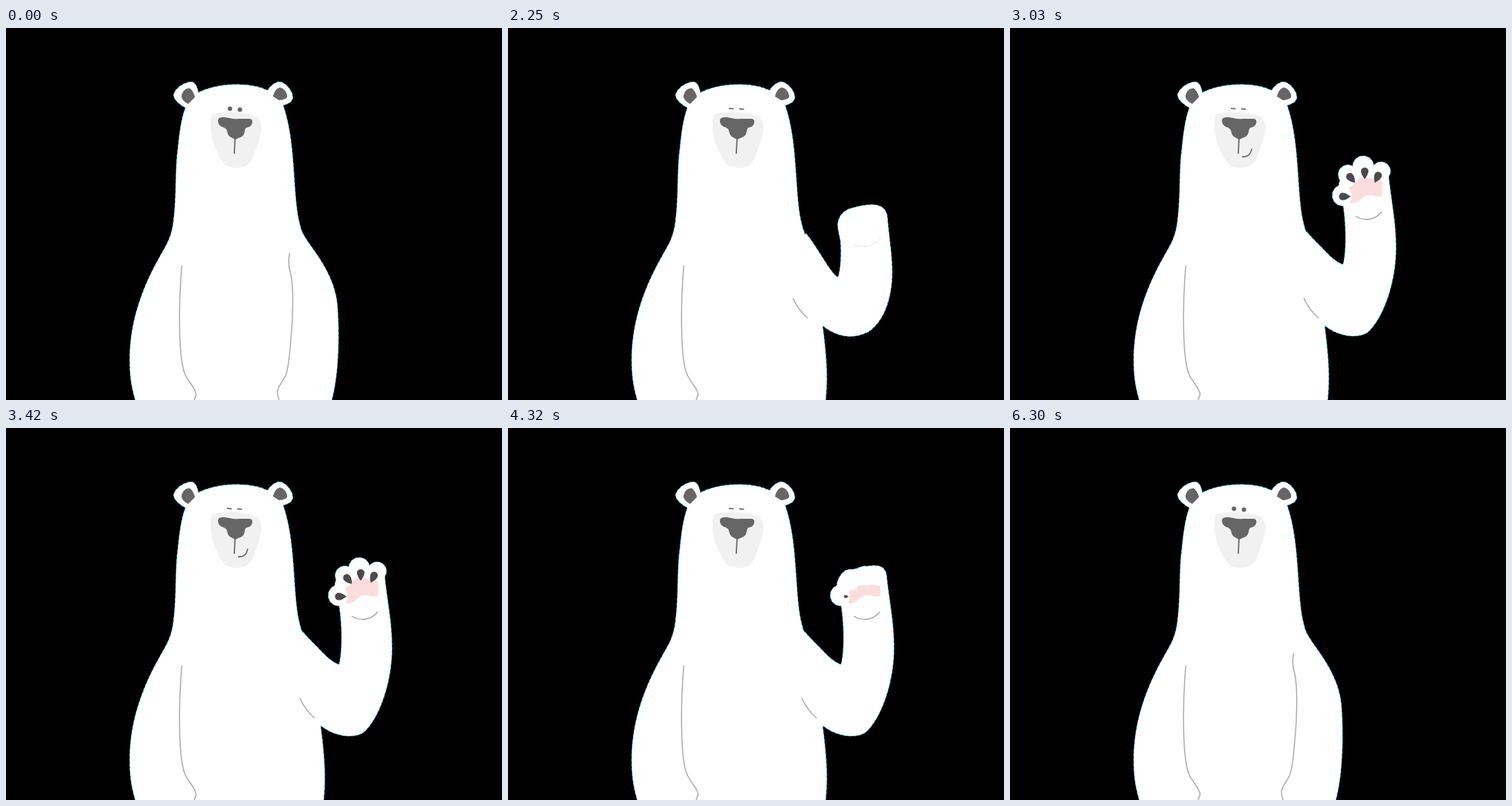
An HTML page with a canvas for the animation above (6330 ms loop, 667 by 500 pixels).

```html
<!DOCTYPE html>
<html>
<head>
<meta charset="utf-8">
<title>Waving bear</title>
<style>
html, body { margin: 0; width: 100%; height: 100%; overflow: hidden; background: #000; }
canvas { display: block; }
</style>
</head>
<body>
<canvas id="stage" width="667" height="500"></canvas>
<script>
const ctx = document.getElementById('stage').getContext('2d');
const LOOP = 6330, STEP = 30;
const GREY = '#666', LINE = '#a6a6a6';

const clamp = v => Math.max(0, Math.min(1, v));
const ramp = (t, a, b) => clamp((t - a) / (b - a));
const easeOut = u => 1 - (1 - u) ** 3;
const easeIn = u => u ** 2;

// Blend two path strings that share the same commands.
function mix(a, b, k) {
  const ends = b.match(/[\d.]+/g);
  let i = 0;
  return a.replace(/[\d.]+/g, n => (+n + (ends[i++] - n) * k).toFixed(2));
}

const head = 'M174,500C168,480 166.5,465 166.5,446C166.5,400 180,355 206,309C216,291 222,283 225,262' +
  'C230,225 227,190 231.5,160C234.5,130 237.5,118 241.5,107C234,103 226.5,97 225.5,91' +
  'C225.5,83 238,73.5 248,72.5C254,72 257,78 258.5,87C285,73 330,72.5 351.5,84' +
  'C358,75 364,72 369,72.5C377,74.5 386.5,86 385.5,94C384,100.5 378,102 372.5,104' +
  'C383.5,135 385.5,170 388.5,215C390.5,245 393.5,262 398.5,275';
const restBody = new Path2D(head +
  'C402,282 410,293 417,303C430,322 443,345 445.5,372C447.5,400 447.5,425 446,445C445,465 442,485 438,500Z');
const waveBody = new Path2D(head + 'C410,330 420,370 423,400C428,440 430.5,470 427,500Z');

const armLow = 'M400,276C405,280 412,292 420,304C430,320 438,333 444,335C449,320 448,292 447,285' +
  'C445,275 443.5,270 443.5,263C445,250 455,243.5 463,242C475,238.5 484,237.5 491,237.5' +
  'C503,238.5 508,243 510,253C512,280 516,300 516.5,325C517,358 508,392 485,408' +
  'C462,420 440,414 422,399L380,340Z';
const armHigh = 'M399,274C405,281 414,290 420,296C430,307 440,316 448,318C453,300 452,262 448,238' +
  'C446,228 442,222 442,212C444,199 452,190 460,190C470,191 474,184 483,186C499,183 507,186 509,198' +
  'C512,230 519,260 519,295C519,340 503,388 482,408C468,419 440,414 422,399L380,340Z';
const elbow = ['M383,363C388,374 395,383 403,390', 'M395,363C400,374 406,382 415,390'];
const wrist = ['M465,291C478,297 492,293 500,284', 'M465,253C478,261 492,257 500,247'];
const padShut = 'M459,218C464,219 468,217 471,212C475,210 481,214 487,210C493,212 498,212 500,212' +
  'C501,216 501,222 500,226C494,229 484,222 477,226C470,232 464,237 457,235C462,228 458,222 459,218Z';
const padOpen = 'M456,214C461,213 464,209 467,205C472,199 480,200 487,203C493,201 498,202 500,207' +
  'C501,213 501,219 500,226C494,229 484,222 477,226C470,232 464,237 457,235C462,228 458,220 456,214Z';
const claw = new Path2D('M0,0C-4,-5 -6,-10 -4.5,-13C-2.5,-16.5 2.5,-16.5 4.5,-13C6,-10 4,-5 0,0Z');

const leftArm = 'M236.4,319C233.4,355 232.4,385 234,420C235,445 238,462 243,470' +
  'C249,480 256,486 255.5,493L253,500';
const rightArm = 'M381.4,303C379.4,312 380,322 383,331C387,350 386,390 383,420C381,445 379,460 376,467' +
  'C371,477 365,483 365,489C365,493 366,496 367,500';
const muzzle = 'M275,126C275,116 280,113 290,114C300,112 315,113 325,115C340,117 344,124 343.5,138' +
  'C341,152 335,165 331,177C325,186 318,188 310,188C298,188 291,183 285,168C278,155 275,145 275,126Z';
const nose = 'M285,125C285,120 289,120 294,120C302,121 306,123 313,122L327,122C331,122 332,125 331,128' +
  'C329,133 327,133 323,134C320,137 322,143 317,146L308,150L301,146C297,143 298,138 296,136' +
  'C293,132 286,134 285,125Z';
const ears = 'M236,92C237,84 242,81 247,81C250,82 254,90 254,93L245,102C240,100 236,95 236,92Z' +
  'M359,92C361,84 365,80 369,80C374,81 379,88 378,93C376,96 370,97 367,97Z';
const smile = 'M312,173C319,174 324,170 325,162';

// Circle, curl offset, claw tip, claw angle, sway, opening and closing times.
const fingers = [
  { x: 447.5, y: 225, r: 14, cx: 16, cy: 0, tx: 458, ty: 226.5, a: -90, sx: 0, sy: 0, on: 2460, off: 4266, len: 180 },
  { x: 454.5, y: 197, r: 13, cx: 4, cy: 12, tx: 464, ty: 208, a: -40, sx: 2.5, sy: 3, on: 2520, off: 4200, len: 120 },
  { x: 475, y: 186, r: 14, cx: 0, cy: 14, tx: 477, ty: 203, a: 0, sx: 0, sy: 4.5, on: 2580, off: 4200, len: 120 },
  { x: 499, y: 192.5, r: 12.5, cx: -4, cy: 13, tx: 490.5, ty: 208, a: 25, sx: 0, sy: 0, on: 2640, off: 4200, len: 120 }
];
const blinks = [[690, 780], [1200, 1290], [1410, 1500], [1980, 2070], [2220, 4740],
  [5220, 5310], [5430, 5520], [5940, 6030]];

function fill(path, color) {
  ctx.fillStyle = color;
  ctx.fill(path instanceof Path2D ? path : new Path2D(path));
}
function stroke(path, color, width = 1.4) {
  ctx.strokeStyle = color;
  ctx.lineWidth = width;
  ctx.stroke(path instanceof Path2D ? path : new Path2D(path));
}
function disc(x, y, r) {
  const p = new Path2D();
  p.arc(x, y, r, 0, 7);
  return p;
}

function drawShapes(shapes) {
  ctx.setLineDash([5, 1.5]);
  shapes.forEach(s => stroke(s, '#14b0b8', 1.2));
  ctx.setLineDash([]);
  shapes.forEach(s => fill(s, '#fff'));
}

function drawFace(t) {
  fill(ears, GREY);
  fill(muzzle, '#f1f1f1');
  fill(nose, GREY);
  stroke('M308,148L307,169', GREY, 1.7);
  if (blinks.some(([a, b]) => t >= a && t < b)) {
    stroke('M297,108L303.5,108.6M311,108.6L317.5,109.2', GREY, 1.6);
  } else {
    fill(disc(301.2, 108.4, 3), GREY);
    fill(disc(314.6, 109.8, 3), GREY);
  }
  const s = ramp(t, 2520, 2700) - ramp(t, 4200, 4310);
  if (s > 0) {
    ctx.setLineDash([19 * s, 40]);
    stroke(smile, GREY, 1.6);
    ctx.setLineDash([]);
  }
}

function drawWave(t) {
  const lift = t < 2250 ? -.3 : easeOut(ramp(t, 2250, 2520)) - 1.4 * easeIn(ramp(t, 4440, 4740));
  const drop = 50 * (1 - lift);
  const sway = (1 - Math.cos((t - 3030) / 520 * 2 * Math.PI)) / 2 * ramp(t, 2700, 2850);
  const pose = fingers.map(f => {
    const open = ramp(t, f.on, f.on + 180) - ramp(t, f.off, f.off + f.len);
    const curl = 1 - Math.min(1, 2 * open);
    const dx = f.cx * curl + f.sx * sway, dy = f.cy * curl + f.sy * sway + drop;
    return { f, open, dx, dy };
  }).filter(p => p.open > 0);
  drawShapes([waveBody, new Path2D(mix(armLow, armHigh, lift)),
    ...pose.map(({ f, dx, dy }) => disc(f.x + dx, f.y + dy, f.r))]);

  if (pose.length) {
    const spread = ramp(t, 2580, 2760) - ramp(t, 4200, 4320);
    ctx.save();
    ctx.translate(0, drop);
    ctx.globalAlpha = clamp(pose[0].open * 2);
    fill(mix(padShut, padOpen, spread), '#fcdddd');
    ctx.restore();
  }

  for (const { f, open, dx, dy } of pose) {
    const size = clamp(2 * open - 1);
    if (!size) continue;
    ctx.save();
    ctx.translate(f.tx + dx, f.ty + dy);
    ctx.rotate(f.a * Math.PI / 180);
    ctx.scale(size, size);
    fill(claw, '#4a4a4c');
    ctx.restore();
  }
  stroke(mix(...elbow, lift), LINE);
  ctx.globalAlpha = clamp(.2 + lift);
  stroke(mix(...wrist, lift), LINE);
  ctx.globalAlpha = 1;
}

function draw(now) {
  const t = Math.floor(now % LOOP / STEP) * STEP;
  ctx.fillStyle = '#000';
  ctx.fillRect(0, 0, 667, 500);
  if (t >= 2220 && t < 4740) {
    drawWave(t);
  } else {
    drawShapes([restBody]);
    stroke(rightArm, LINE);
  }
  stroke(leftArm, LINE);
  drawFace(t);
}

const start = performance.now();
function tick() {
  draw(performance.now() - start);
  requestAnimationFrame(tick);
}
tick();
</script>
</body>
</html>
```
